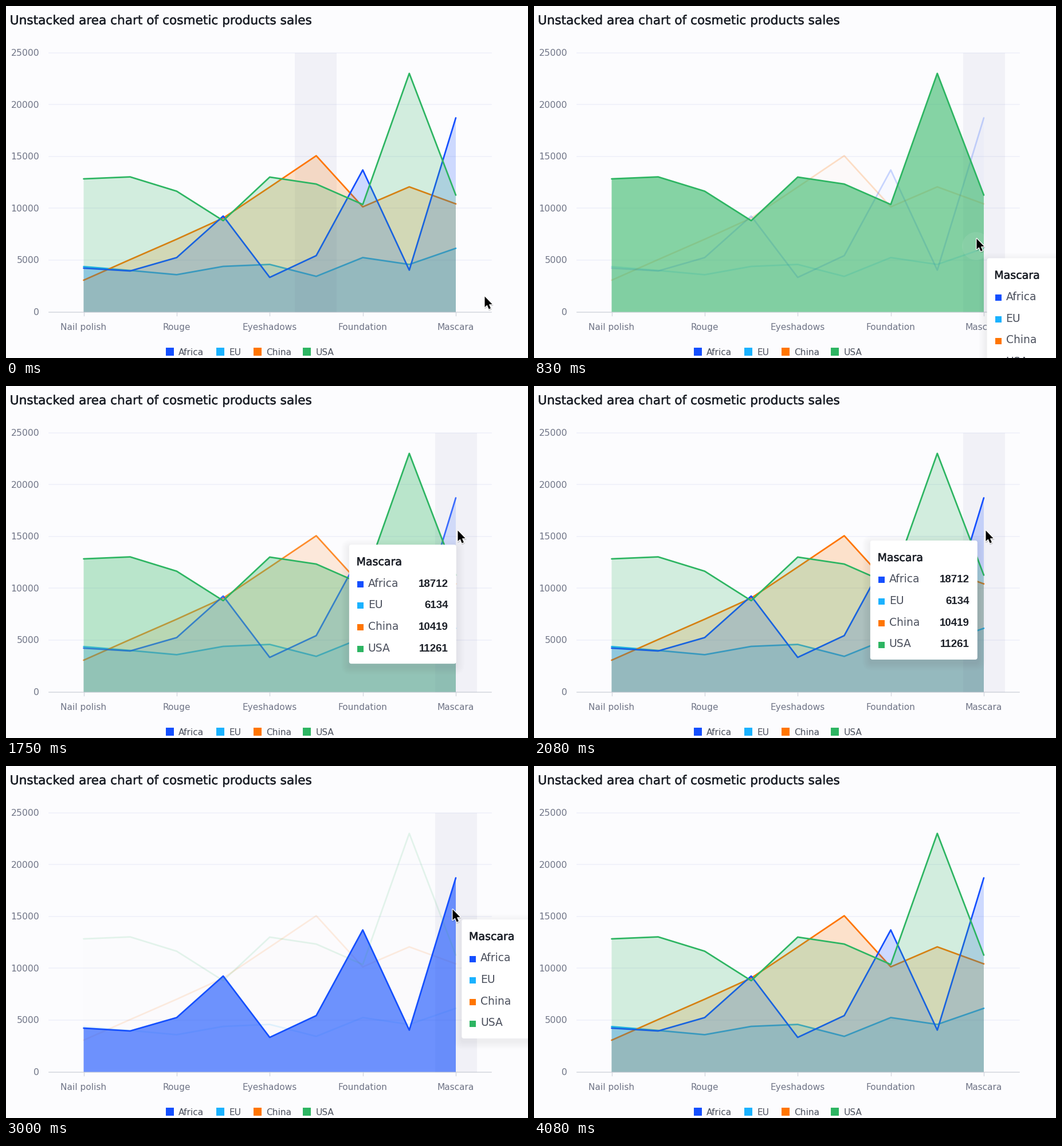
A matplotlib script that plays this animation: 911 px wide and 615 px high, repeating every 4330 ms.

```python
import numpy as np
import matplotlib.pyplot as plt
from matplotlib.animation import FuncAnimation
from matplotlib.patches import Circle, FancyBboxPatch, Polygon, Rectangle
from matplotlib.patheffects import withStroke
from matplotlib.transforms import Affine2D

W, H, DPI = 911, 615, 64
LOOP_MS, STEPS, SUB = 4330, 52, 4
PT = 72 / DPI  # points per pixel

SANS, NUMERIC = "DejaVu Sans", "Liberation Sans"
INK, LABEL, GREY, RULE = "#1d2129", "#4b505d", "#6f7486", "#d3d6de"
LEFT, RIGHT, TOP, BASE = 74, 846, 81, 534
CATEGORIES = ["Nail polish", "Rouge", "Eyeshadows", "Foundation", "Mascara"]
XS = np.linspace(135, 784.5, 9)

COLORS = {"Africa": "#144fff", "EU": "#1ab2ff", "China": "#ff7500", "USA": "#2db562"}
SALES = {  # in drawing order
    "EU": [4370, 4000, 3590, 4390, 4580, 3430, 5240, 4580, 6134],
    "China": [3060, 5050, 7010, 9050, 12040, 15060, 10130, 12060, 10419],
    "Africa": [4222, 3950, 5240, 9245, 3330, 5430, 13690, 4030, 18712],
    "USA": [12830, 13020, 11640, 8800, 13000, 12330, 10360, 23000, 11261],
}

ENTER, LEAVE, GONE = 6, 45, 49   # pointer over the chart, pointer off the stage
FADE = 5.5                       # steps a hover fade takes
HOVER = {"USA": (5.5, 17.5), "Africa": (25.25, 42.5)}  # fade in, fade out
CURSOR_KEYS = np.array([  # step, x, y
    (5, 835, 507), (6, 783, 479), (10, 772, 406), (20, 788, 252), (25, 788, 252),
    (28, 781, 252), (31, 780, 251), (35, 780, 251), (36, 779, 250), (42, 779, 250),
    (43, 790.5, 166), (44, 858, 71), (48, 857, -20)])
TIP_W, TIP_H = 187, 208


def y_of(value):
    return BASE - np.asarray(value) * (BASE - TOP) / 25000


def smooth(t):
    t = np.clip(t, 0, 1)
    return t * t * (3 - 2 * t)


def cursor_at(step):
    return np.array([np.interp(step, CURSOR_KEYS[:, 0], col) for col in CURSOR_KEYS[:, 1:].T])


def hover_at(name, step):
    start, end = HOVER.get(name, (STEPS, STEPS))
    return smooth((step - start) / FADE) - smooth((step - end) / FADE)


def tip_at(step):
    """The tooltip halves its distance to the pointer each step and
    flips to the left once the pointer is past the last point."""
    pos = None
    for s in range(ENTER, max(step, ENTER) + 1):
        x, y = cursor_at(s)
        if y < TOP:
            break
        goal = np.array([x + 15.5 if x <= XS[-1] else x - 15.5 - TIP_W, y + 17])
        pos = goal if pos is None else (pos + goal) / 2
    return pos


fig = plt.figure(figsize=(W / DPI, H / DPI), dpi=DPI, facecolor="#fcfcfe")
ax = fig.add_axes([0, 0, 1, 1])
ax.set(xlim=(-.5, W - .5), ylim=(H - .5, -.5))  # whole numbers are pixel centres
ax.axis("off")


def text(x, y, s, px, color, z=1, shift=None, stroke=0, family=SANS, **kw):
    t = ax.text(x, y, s, fontsize=px * PT, color=color, family=family, zorder=z,
                va="baseline", **kw)
    if shift is not None:
        t.set_transform(shift + ax.transData)
    if stroke:
        t.set_path_effects([withStroke(linewidth=stroke * PT, foreground=color)])
    return t


def patch(p, z, shift=None):
    if shift is not None:
        p.set_transform(shift + ax.transData)
        p.set_clip_on(False)
    p.set_zorder(z)
    ax.add_artist(p)
    return p


def line(xs, ys, color, px, z, **kw):
    return ax.plot(xs, ys, color=color, lw=px * PT, zorder=z, **kw)[0]


def square(x, y, size, color, z, shift=None):
    return patch(Rectangle((x, y), size, size, fc=color, lw=0), z, shift)


def build_axes():
    text(6.3, 31.5, "Unstacked area chart of cosmetic products sales", 21.65, INK, stroke=.5)
    for value in range(0, 25001, 5000):
        y = float(y_of(value))
        text(57.5, y + 5.5, str(value), 15.6, GREY, ha="right")
        line([LEFT, RIGHT], [y, y], "#eeeffa" if value else RULE, 1.5, 1)
    for x, name in zip(XS[::2], CATEGORIES):
        line([x, x], [BASE, BASE + 6], RULE, 1.3, 1)
        text(x, 565.3, name, 15.4, GREY, ha="center")
    for x, (name, color) in zip((278, 366.5, 431, 517.5), COLORS.items()):
        square(x, 596.5, 14, color, 1)
        text(x + 22.5, 609.2, name, 15.4, LABEL)


def build_series():
    series = {}
    for z, (name, values) in enumerate(SALES.items(), 2):
        ys = y_of(values)
        outline = [(XS[0], BASE), *zip(XS, ys), (XS[-1], BASE)]
        area = patch(Polygon(outline, fc=COLORS[name], lw=0), z)
        stroke = line(XS, ys, COLORS[name], 2.7, z + .5, solid_joinstyle="round",
                      solid_capstyle="round")
        series[name] = area, stroke
    return series


def build_tooltip(shift):
    def card(grow, dy, color, alpha):
        pad = 4 + grow
        box = FancyBboxPatch((4, 4 + dy), TIP_W - 8, TIP_H - 8,
                             boxstyle=f"round,pad={pad},rounding_size={pad}",
                             fc=color, lw=0, alpha=alpha)
        return patch(box, 10, shift)

    parts = [card(grow, 5, "#1b2130", .007) for grow in range(14, 0, -2)]
    parts.append(card(0, 0, "white", 1))
    parts.append(text(12.7, 36, "Mascara", 19, INK, 11, shift, .6))
    for k, (name, color) in enumerate(COLORS.items()):
        base = 73.3 + 37.7 * k
        parts += [
            square(14, base - 9.8, 11, color, 11, shift),
            text(33, base, name, 18.7, LABEL, 11, shift),
            text(173, base, str(SALES[name][-1]), 18.7, INK, 11, shift,
                 family=NUMERIC, weight="bold", ha="right"),
        ]
    return parts


def build_cursor(shift):
    arrow = np.array([(0, 0), (0, 18.6), (4.2, 14.9), (7.2, 22), (10.4, 20.6),
                      (7.4, 13.8), (13, 13.5)])
    edge = dict(lw=2.6 * PT, joinstyle="round")
    return [
        patch(Polygon(arrow + (.6, 1.6), fc="black", ec="black", alpha=.15, **edge), 20, shift),
        patch(Polygon(arrow, fc="black", ec="white", **edge), 21, shift),
        patch(Polygon(arrow, fc="black", lw=0), 22, shift),
    ]


tip_shift, cursor_shift = Affine2D(), Affine2D()
build_axes()
band = patch(Rectangle((503.5, TOP), 73, BASE - TOP, fc="#141464", alpha=.043, lw=0), 1.5)
series = build_series()
halo = patch(Circle((771, 419), 24.5, fc="white", alpha=.08, lw=0), 9)
tooltip = build_tooltip(tip_shift)
cursor = build_cursor(cursor_shift)


def show(parts, visible):
    for part in parts:
        part.set_visible(visible)


def draw(i):
    step = min((i + 1) // SUB, STEPS - 1)
    for name, (area, stroke) in series.items():
        own = hover_at(name, step)
        other = max(hover_at(key, step) for key in HOVER if key != name)
        area.set_alpha(.2 + .41 * own - .198 * other)
        stroke.set_alpha(1 - .88 * other ** 1.3)

    band.set_x(503.5 if step < ENTER else 748.5)
    band.set_visible(step < LEAVE)
    halo.set_visible(abs(step - 10) <= 1)

    tip_shift.clear().translate(*tip_at(step))
    show(tooltip, ENTER <= step < LEAVE)
    cursor_shift.clear().translate(*cursor_at(step))
    show(cursor, step < GONE)
    return []


anim = FuncAnimation(fig, draw, frames=STEPS * SUB, interval=LOOP_MS / (STEPS * SUB),
                     init_func=lambda: draw(0), repeat=True, repeat_delay=0)
plt.show()
```
